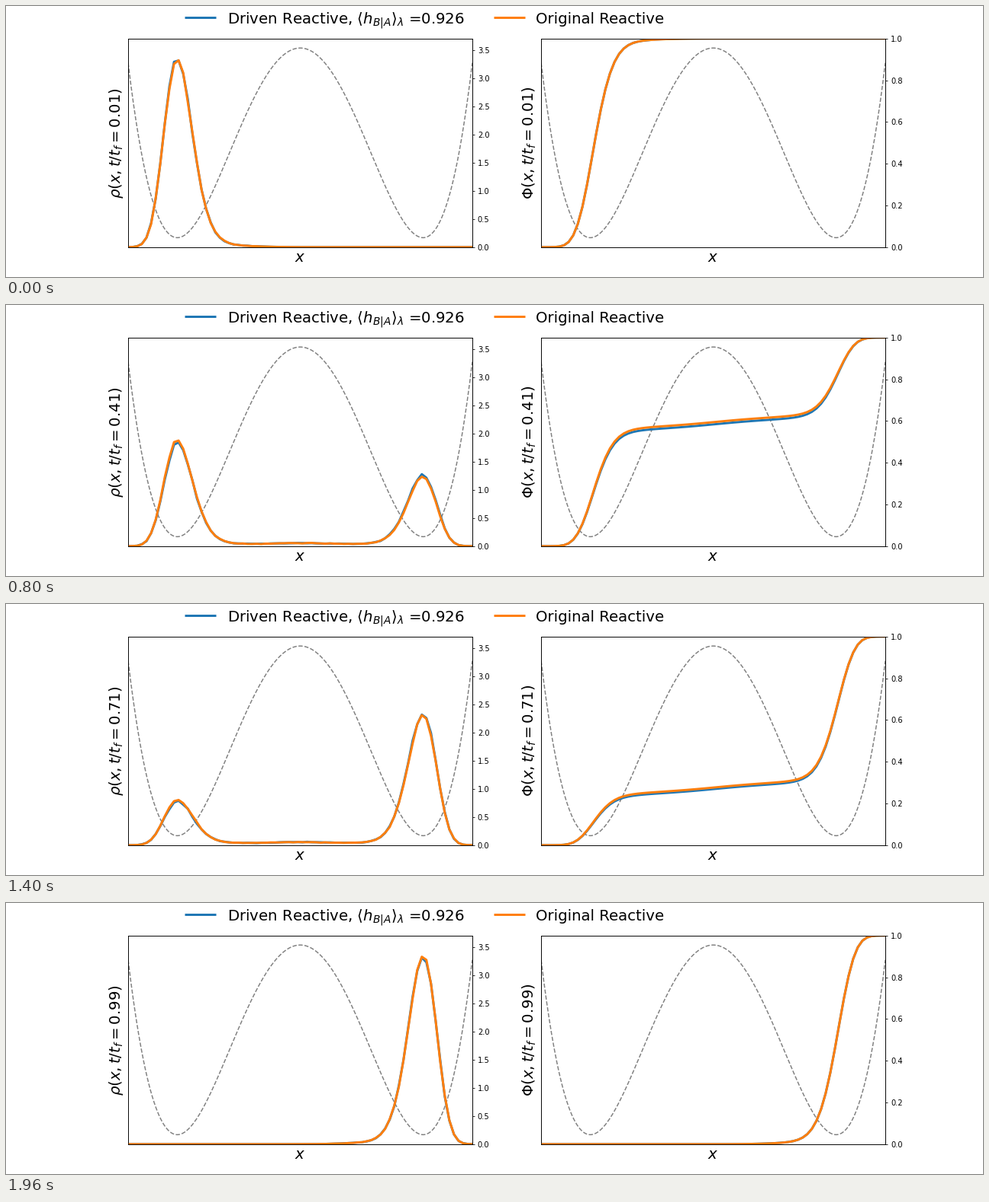
Recreate the animation shown at these times as a matplotlib script. Size 1280 by 356 pixels, loop 1980 ms.

```python
import numpy as np
import matplotlib.pyplot as plt
from matplotlib.animation import FuncAnimation
from matplotlib.lines import Line2D

W, H = 1280, 356
DPI = W / 18
FRAMES, INTERVAL = 99, 20
BARRIER = 9.3      # barrier height in units of kT
DIFFUSION = 2.0    # diffusion constant times the total time
EDGE = 0.7         # the two states are x < -EDGE and x > EDGE
BINS, FINE = 75, 3
BLUE, ORANGE = "#1f77b4", "#ff7f0e"

# Overdamped motion in a double well, solved through a symmetric generator.
grid = np.linspace(-1.4, 1.4, BINS * FINE + 1)
step = grid[1] - grid[0]
energy = BARRIER * (grid**2 - 1) ** 2
weight = np.exp(-energy / 2)
hop = DIFFUSION / step**2
jump = np.exp(np.diff(energy) / 2)
leave = np.zeros_like(grid)
leave[:-1] += hop / jump
leave[1:] += hop * jump
side = np.full(len(grid) - 1, hop)
rates, modes = np.linalg.eigh(np.diag(side, 1) + np.diag(side, -1) - np.diag(leave))
start = modes.T @ (weight * (grid < -EDGE))
finish = modes.T @ (weight * (grid > EDGE))

x = grid[::FINE]
dx = x[1] - x[0]


def density(t):
    """Density at time t of paths that start left and end right."""
    forward = modes @ (np.exp(rates * t) * start)
    backward = modes @ (np.exp(rates * (1 - t)) * finish)
    rho = np.clip(forward * backward, 0, None)[::FINE]
    return rho / (rho.sum() * dx)


def sample(t, rng):
    rho = density(t)
    noisy = np.clip(rho + 0.01 * np.sqrt(rho) * rng.standard_normal(x.size), 0, None)
    total = np.concatenate([[0], np.cumsum(rho)[:-1]]) * dx
    return noisy, total


fig, axes = plt.subplots(1, 2, figsize=(18, H / DPI + 1e-9), dpi=DPI)
fig.subplots_adjust(left=0.125, right=0.9, bottom=0.11, top=0.88, wspace=0.2)

fine_x = np.linspace(-1.4, 1.4, 400)
curves = []
for ax, top in zip(axes, (3.7, 1.0)):
    ax.plot(fine_x, (fine_x**2 - 1) ** 2, "--", color="gray", lw=1.5)
    ax.set(xlim=(-1.4, 1.4), ylim=(-0.05, 1.05), xticks=[], yticks=[])
    ax.set_xlabel("$x$", fontsize=20)
    twin = ax.twinx()
    twin.set_ylim(0, top)
    curves.append([twin.plot([], [], color=c, lw=3)[0] for c in (BLUE, ORANGE)])


def legend_entry(left, text_left, color, text):
    y = 1 - 15.5 / H
    fig.add_artist(Line2D([left / W, (left + 41) / W], [y, y], color=color, lw=3,
                          solid_capstyle="butt"))
    fig.text(text_left / W, 1 - 23 / H, text, fontsize=20, va="baseline")


legend_entry(234, 290, BLUE,
             r"Driven Reactive, $\langle h_{B|A}\rangle_\lambda$ =0.926")
legend_entry(639, 694.5, ORANGE, "Original Reactive")


def update(i):
    t = (i + 1) / 100
    rng = np.random.default_rng(100 + i)
    ahead = t + 0.011 * np.sin(np.pi * t) ** 2
    for k, time in enumerate((ahead, t)):
        rho, total = sample(time, rng)
        curves[0][k].set_data(x, rho)
        curves[1][k].set_data(x, total)
    for ax, symbol in zip(axes, (r"\rho", r"\Phi")):
        ax.set_ylabel(rf"${symbol}(x,t/t_f={t:.2f})$", fontsize=20)
    return curves[0] + curves[1]


anim = FuncAnimation(fig, update, frames=FRAMES, interval=INTERVAL,
                     init_func=lambda: update(0), repeat=True, repeat_delay=0)
plt.show()
```
